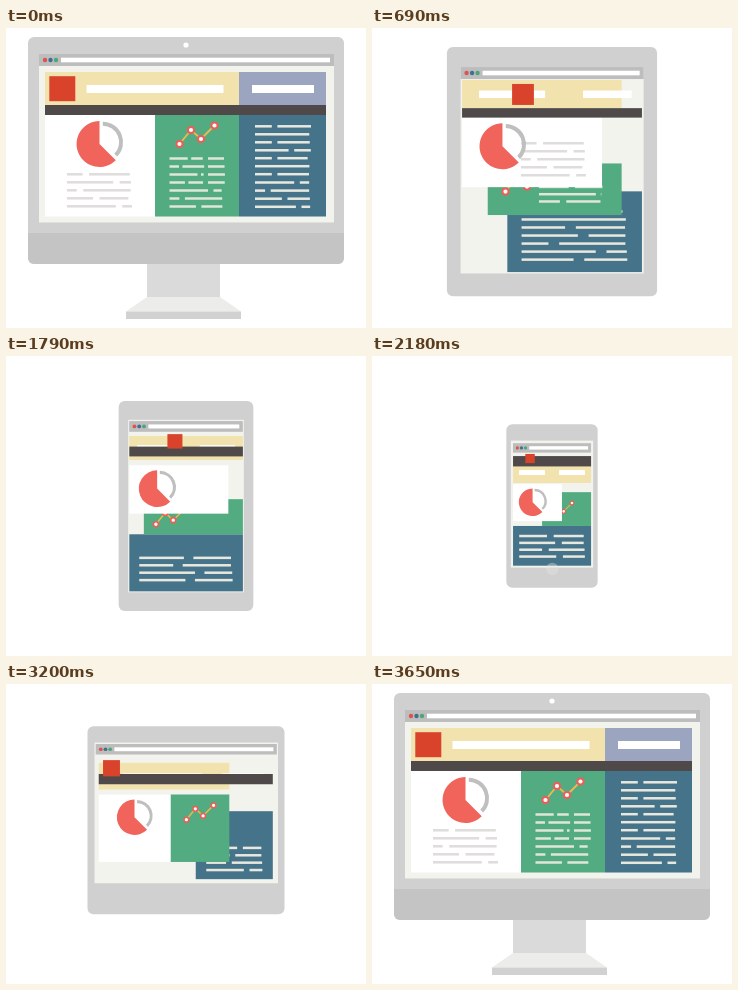
An HTML page that plays this animation: 360x300 px, repeating every 4.15 s.

```html
<!DOCTYPE html>
<html lang="en">
<head>
<meta charset="utf-8">
<title>Responsive layout</title>
<style>
html, body { margin: 0; width: 100%; height: 100%; overflow: hidden; background: #fff; }
svg { display: block; width: 100vw; height: 100vh; }
</style>
</head>
<body>
<svg id="stage" viewBox="0 0 360 300"></svg>
<script>
const LOOP = 4150, STEP = 30, STEPS = 30;
const STARTS = [30, 1430, 2780]; // desktop>tablet, tablet>phone, phone>desktop
const MID = 180;
const stage = document.getElementById('stage');
const items = [];

// grid lines of the page on each device
const desk = { x: [39, 149, 233, 320], y: [44, 77, 87, 188.5] };
const tab = { x: [105.6, 254.7], y: [54.4, 81.1, 90.4, 150.2, 186.6, 261] };
const phone = { x: [146.5, 180, 213.6], y: [103, 113.5, 134, 167.4, 201.8] };

let seed = 11;
const rand = () => (seed = seed * 16807 % 2147483647) / 2147483647;

function make(tag, attrs, parent = stage) {
  const el = document.createElementNS('http://www.w3.org/2000/svg', tag);
  for (const k in attrs) el.setAttribute(k, attrs[k]);
  parent.appendChild(el);
  return el;
}

// keys hold the values for desktop, tablet and phone; null means absent there
function track(el, keys, place, shown = keys.map(Boolean)) {
  items.push({ el, keys, place, shown });
  return el;
}

function placeBox(el, [x0, y0, x1, y1]) {
  el.setAttribute('x', x0);
  el.setAttribute('y', y0);
  el.setAttribute('width', x1 - x0);
  el.setAttribute('height', y1 - y0);
}

function placeGroup(el, [x, y, s]) {
  el.setAttribute('transform', `translate(${x} ${y}) scale(${s})`);
}

const box = (fill, keys, shown, rx = 0) =>
  track(make('rect', { fill, rx }), keys, placeBox, shown);

const group = (...keys) => track(make('g', {}), keys, placeGroup);

// the box between two columns and two rows of a grid
const cell = (g, c0, c1, r0, r1) => [g.x[c0], g.y[r0], g.x[c1], g.y[r1]];

// lines of dummy text, each split in two words at a share of its width
const lines = (x, w, y, pitch, splits) => ({ x, w, y, pitch, splits });

function block(fill, keys, shown) {
  const rows = keys[0].splits.length;
  for (let r = 0; r < rows; r++) {
    const end = 1 - .07 * rand();
    for (const word of [0, 1]) {
      box(fill, keys.map(k => {
        if (!k) return null;
        const cut = Math.min(k.splits[r], end);
        const a = word ? Math.min(cut + .1, end) : 0;
        const b = word ? end : cut;
        const y = k.y + r * k.pitch;
        return [k.x + a * k.w, y - 1.25, k.x + b * k.w, y + 1.25];
      }), shown);
    }
  }
}

// device
const stand = group([0, 0, 1], null, null);
make('path', { d: 'M141 235H214V270H141Z', fill: '#dadada' }, stand);
make('path', { d: 'M141 269H214L235 283.5H120Z', fill: '#ececea' }, stand);
make('path', { d: 'M120 283.5H235V291H120Z', fill: '#d1d1d1' }, stand);

box('#d0d0d0', [[22, 9, 338, 236], [91, 22, 269, 278], [141, 75.3, 219, 224.7]], undefined, 6);

const chin = group([0, 0, 1], null, null);
make('path', { d: 'M22 205H338V230A6 6 0 0 1 332 236H28A6 6 0 0 1 22 230Z', fill: '#c4c4c4' }, chin);
make('circle', { cx: 180, cy: 17, r: 2.6, fill: '#fff' }, chin);

// browser
const screens = [[33, 26, 328, 194.5], [105.5, 43, 254.5, 261], [144, 91, 216, 204]];
const bars = screens.map(([x0, y0, x1], i) => {
  const inset = i === 2 ? 2.4 : 0, top = y0 + 1.25 * inset;
  return { x0: x0 + inset, x1: x1 - inset, top, h: 12 - 1.25 * inset, unit: i === 2 ? .7 : 1 };
});
box('#f1f3ec', screens);
box('#bdbdbd', bars.map(b => [b.x0, b.top, b.x1, b.top + b.h]));
['#e0524f', '#3f7090', '#4ea57c'].forEach((fill, i) => {
  const dot = make('circle', { r: 2.2, fill });
  track(dot, bars.map(b => [b.x0 + (6 + 5.5 * i) * b.unit, b.top + b.h / 2, b.unit]), placeGroup);
});
box('#fff', bars.map(b => {
  const y = b.top + b.h / 2, half = 2.3 * b.unit;
  return [b.x0 + 22 * b.unit, y - half, b.x1 - 4 * b.unit, y + half];
}));

// blue panel: the last rows stay on every device
const PALE = '#e9e8df';
box('#45738a', [cell(desk, 2, 3, 2, 3), cell(tab, 0, 1, 4, 5), cell(phone, 0, 2, 3, 4)]);
block(PALE, [lines(249, 56, 98.3, 8, [.3, 1, .3, .6]), null, null]);
block(PALE, [
  lines(249, 56, 130.2, 8, [.3, 1, .3]),
  lines(119.3, 123, 199.7, 8, [.6, 1, .42]),
  lines(151.5, 58, 153.3, 6.67, [.6, 1, .42])
], [true, true, false]);
block(PALE, [
  lines(249, 56, 154.5, 8.1, [.7, .18, .48, .73]),
  lines(119.3, 123, 223.7, 8, [.5, .26, .72, .45]),
  lines(151.5, 58, 173.3, 6.67, [.39, .63, .22, .59])
]);

// green panel
const MINT = '#dfe8d8';
box('#53ab82', [cell(desk, 1, 2, 2, 3), cell(tab, 0, 1, 3, 4), cell(phone, 1, 2, 2, 3)]);
block(MINT, [
  lines(163.5, 35, 130.5, 8, [.52, .27, .8, .44]),
  lines(168, 73, 158.1, 7.05, [.71, .49, .9, .31]),
  null
]);
block(MINT, [lines(202, 17, 130.5, 8, [1, 1, 1, 1]), null, null]);
block(MINT, [lines(163.5, 55, 162.5, 8, [.7, .18, .48]), null, null]);

const chart = group([173.5, 116, 1], [121.3, 178, 1], [187.3, 155.4, .554]);
const points = [[0, 0], [11.5, -14], [21.5, -5], [35, -18.5]];
make('polyline', { points: points.join(' '), fill: 'none', stroke: '#efb94f', 'stroke-width': 1.8 }, chart);
for (const [cx, cy] of points)
  make('circle', { cx, cy, r: 3.1, fill: '#fff', stroke: '#ec5f57', 'stroke-width': 2 }, chart);

// white panel
const whiteSplits = [.24, .71, .15, .4, .75];
box('#fff', [cell(desk, 0, 1, 2, 3), cell(tab, 0, 1, 2, 3), cell(phone, 0, 1, 2, 3)]);
block('#dedddb', [[61, 146.3], [175.7, 105.8], [101, 149.3]]
  .map(([x, y]) => lines(x, 65, y, 8, whiteSplits)), [true, true, false]);

const pie = group([93.5, 116, 1], [141.7, 119, 1], [163.5, 150.4, .54]);
make('path', { d: 'M0 0V-23A23 23 0 1 0 16.3 16.3Z', fill: '#f0645c' }, pie);
make('path', { d: 'M3.3 -20.2A18.4 18.4 0 0 1 16.2 11.2', fill: 'none', stroke: '#bfbfbf', 'stroke-width': 4 }, pie);

// header
box('#f2e2ae', [cell(desk, 0, 2, 0, 1), cell(tab, 0, 1, 0, 1), cell(phone, 0, 2, 1, 2)]);
box('#9ba5bf', [cell(desk, 2, 3, 0, 1), null, null]);

// the two inputs mirror each other around the middle, except on the desktop
for (const [side, x0, x1] of [[-1, 80.5, 217.5], [1, 246, 308]]) {
  const input = (gap, w, y0, y1) => {
    const x = MID + side * (gap + w / 2);
    return [x - w / 2, y0, x + w / 2, y1];
  };
  box('#fff', [[x0, 57, x1, 65], input(20.4, 44.6, 64.2, 71.6), input(5, 23, 121.7, 126.3)]);
}
box('#4f4a49', [cell(desk, 0, 3, 1, 2), cell(tab, 0, 1, 1, 2), cell(phone, 0, 2, 0, 1)]);

const badge = group([56.3, 60.7, 1], [179.8, 68.2, .79], [154.7, 107.8, .3]);
make('rect', { x: -13, y: -12.5, width: 26, height: 25, fill: '#d9432b' }, badge);

// phone button
const home = group(null, null, [180.3, 213, 1]);
make('circle', { r: 6.2, fill: '#e6e5e0' }, home);

const blend = (a, b, p) => a.map((v, i) => v + (b[i] - v) * p);

// parts missing on the next device leave early, new ones arrive late
function fade(before, after, p) {
  if (before && after) return 1;
  if (before) return Math.max(0, 1 - p / .13);
  return after ? Math.max(0, (p - .78) / .22) : 0;
}

function render(time) {
  const t = time % LOOP;
  let from = 0, step = 0;
  STARTS.forEach((s, i) => {
    if (t >= s) {
      from = i;
      step = Math.min(STEPS, Math.floor((t - s) / STEP) + 1);
    }
  });
  const to = (from + 1) % 3, p = step / STEPS;
  for (const { el, keys, place, shown } of items) {
    const alpha = fade(shown[from], shown[to], p);
    el.setAttribute('opacity', alpha);
    if (!alpha) continue;
    const a = shown[from] ? keys[from] : keys[to];
    place(el, blend(a, keys[to] || a, p));
  }
}

function tick() {
  render(performance.now());
  requestAnimationFrame(tick);
}
tick();
</script>
</body>
</html>
```
